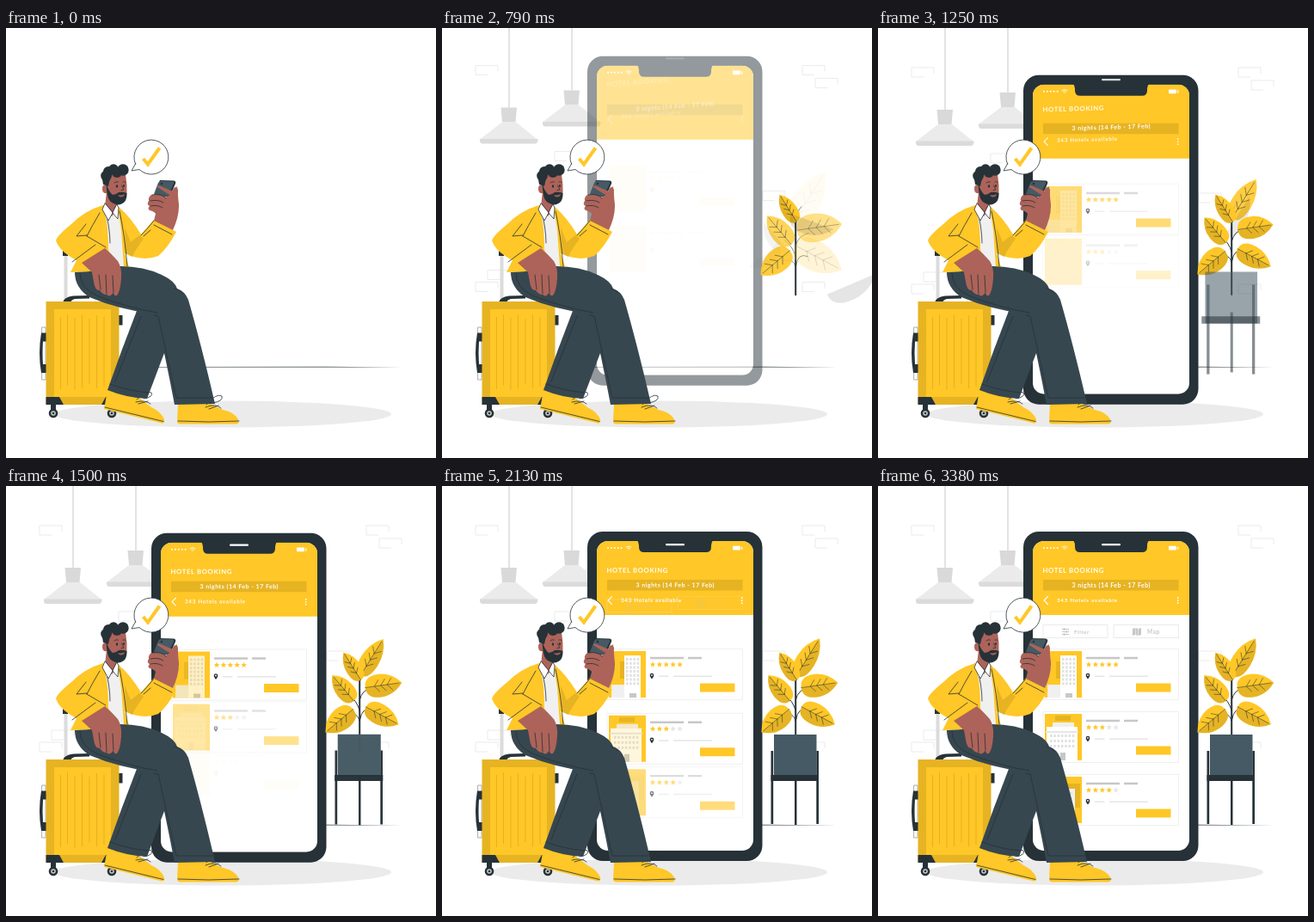
Recreate the animation shown at these times as an HTML page. Size 500x500 px, loop 3.46 s.

```html
<!DOCTYPE html>
<html lang="en">
<head>
<meta charset="utf-8">
<title>Hotel booking</title>
<style>
html, body { margin: 0; width: 100%; height: 100%; overflow: hidden; background: #fff; }
svg { display: block; width: 100vw; height: 100vh; }
text { font-family: Lato, sans-serif; font-weight: 700; }
.y { fill: #ffc727; } .d { fill: #263238; } .p { fill: #37474f; } .skin { fill: #ad6359; }
.w { fill: #fff; } .g { fill: #c7c7c7; } .l { fill: #e6e6e6; } .f { fill: #f0f0f0; } .dy { fill: #e6b323; }
.s { fill: none; stroke: #263238; stroke-width: .8; stroke-linecap: round; stroke-linejoin: round; }
.ws { fill: none; stroke: #fff; stroke-width: 1.2; stroke-linecap: round; stroke-linejoin: round; }
.b { fill: none; stroke: #ebebeb; stroke-width: 1; }
</style>
</head>
<body>
<svg viewBox="0 0 500 500">
<defs>
  <clipPath id="screen"><rect x="180" y="64" width="182" height="360" rx="13"/></clipPath>
  <g id="lamp">
    <path d="M78 0V95" stroke="#c7c7c7"/>
    <path fill="#d9d9d9" d="M68.500 95H87L85.500 112H70Z"/>
    <path fill="#ebebeb" d="M70 112H86L111 132H44Z"/>
    <path fill="#dbdbdb" d="M44 131.500H111.500V133Q111 137 108 137H47Q44 137 44 133Z"/>
  </g>
  <path id="star" d="M0-3.300 1-1.100 3.300-.9 1.500.7 2.100 3 0 1.700-2.100 3-1.500.7-3.300-.9-1-1.100Z"/>
  <path id="brick" class="b" d="M14 11H0V0H26V7"/>
  <g id="wheel"><circle r="5.300" class="d"/><circle r="2.800" fill="#c7c7c7"/><circle r="1.300" class="d"/></g>
</defs>

<ellipse cx="252" cy="449" rx="196" ry="15.500" fill="#ebebeb"/>
<path class="d" d="M176 393.900 372 393.800 460 394.400 372 394.600 176 394.600Z"/>

<g id="backdrop">
  <use href="#lamp"/><use href="#lamp" x="73" y="-20"/>
</g>

<g id="phone">
  <rect class="d" x="169" y="53" width="203.500" height="383" rx="18"/>
  <g clip-path="url(#screen)">
    <path class="w" d="M180 64H362V424H180Z"/>
    <path class="y" d="M180 64H362V150H180Z"/>
  </g>
  <path class="d" d="M226 62Q229 65 229 69V71Q229 77 235 77H307Q313 77 313 71V69Q313 65 316 62Z"/>
  <path class="ws" style="stroke-width:2" stroke-dasharray="0 3.900" d="M193 72H209"/>
  <path class="ws" style="stroke-width:.9" d="M214 71Q217 68.500 220 71M215.500 72.500Q217 71.200 218.500 72.500M217 74V74"/>
  <rect class="w" x="338" y="69.800" width="9" height="4.800" rx="1"/><path class="ws" d="M348.800 71V73.500"/>
  <path class="dy" d="M192 109H349.500V121.500H192Z"/>
  <g id="nav">
    <path class="ws" d="M197.500 128.500 193 133 197.500 137.500"/>
    <path class="ws" style="stroke-width:1.800" d="M348.700 130V130M348.700 133V133M348.700 136V136"/>
  </g>
  <g class="w">
    <text id="title" x="191.500" y="100.500" font-size="7.700" letter-spacing=".65">HOTEL BOOKING</text>
    <text id="nights" x="225.500" y="117.500" font-size="7" letter-spacing=".5">3 nights (14 Feb - 17 Feb)</text>
    <text id="count" x="208" y="134.800" font-size="6.300" letter-spacing=".7">343 Hotels available</text>
  </g>
</g>
<rect id="speaker" class="w" x="260" y="67" width="22" height="2.200" rx="1"/>

<g id="filter">
  <rect class="b" x="192" y="161.500" width="75" height="15"/>
  <path stroke="#c7c7c7" d="M214 166.500H222M214 169.500H222M214 172.500H222M216.500 165V168M219.500 168V171M216.500 171V174"/>
  <text class="g" x="228" y="171.700" font-size="6.300" letter-spacing=".5">Filter</text>
</g>
<g id="map">
  <rect class="b" x="274" y="161.500" width="75.500" height="15"/>
  <path class="g" d="M296 166 299 165V173L296 174ZM299.500 165 302.500 166V174L299.500 173ZM303 166 306 165V173L303 174Z"/>
  <text class="g" x="313" y="171.700" font-size="6.500" letter-spacing=".6">Map</text>
</g>
<g id="cards"></g>

<g id="plant">
  <path id="stem" class="s" style="stroke-width:2" d="M411.200 310V217"/>
  <path id="twigs" class="s" style="stroke-width:1" d="M411.500 222Q412 209 418 203M411.500 228Q411 222 407 217M411.500 248Q414 237 426 234M411.500 262Q408 249 398 242M411.500 272Q414 256 425 261M411.500 274Q409 262 397 266"/>
  <g id="leaves"></g>
  <g id="stand">
    <path class="d" d="M382.500 308H385.200V393H382.500Z"/>
    <path class="d" d="M410 337H412.500V394H410Z"/>
    <path class="d" d="M435.300 308H438V393H435.300Z"/>
    <path fill="#455a64" d="M386 289H435.500V338H386Z"/>
    <path class="d" d="M382.500 336H438V343H382.500Z"/>
  </g>
</g>

<g id="suitcase">
  <path fill="#dbdbdb" d="M67.500 264H71.500V319H67.500Z"/>
  <path class="d" d="M66 259H72V265H66ZM66 319Q67 313 78 311.500L97 311V314.500L80 315Q76 316 75 319ZM131 334H135.500V345.500H131Z"/>
  <path class="w s" d="M42 348H46V409H42Z" style="stroke:#999"/>
  <path class="d" d="M41 354.500H47V364.500H43Q42 378 43 391H47V401H41Q37 378 41 354.500Z"/>
  <path class="dy" d="M46.500 318H131.500V438H46.500Z"/>
  <path class="y" d="M56 327H122V429H56Z"/>
  <path d="M63.500 336V420M71.500 333V416M80 337V421M88.500 334V419M97 338V414M105.500 334V419M114 336V417" stroke="#dba91c" stroke-width=".7"/>
  <path class="d" d="M46.500 429H62L67 438H46.500ZM131.500 429H116L111 438H131.500ZM52 438H58V444H52ZM120 438H126V444H120Z"/>
  <use href="#wheel" x="55" y="448"/><use href="#wheel" x="123" y="448"/>
</g>

<g id="man">
  <path class="y" d="M118 421 114 443 181 459.500Q185 460 184 455 180 446 169 441L155 430Z"/>
  <path class="s" d="M115 441 183 457.500M152 432Q164 420 169 424 172 429 160 431M151 435Q162 432 168 437M154 437 165 434"/>
  <path class="p" d="M152 329Q134 375 118 421 140 430 164 431L187 370 195 320Z"/>
  <path class="s" d="M121 414Q142 422 166 424M157 335 127 411"/>
  <path class="y" d="M200 437 199 457Q199 460.500 203 460.500H268Q272 460 270 455 266 447 252 444L236 436Z"/>
  <path class="s" d="M200 457Q236 459 271 457M233 438Q245 424 251 428 253 434 240 436M232 441Q244 436 250 442M236 443 247 439"/>
  <path class="y" d="M113 206Q92 212 76 228 60 241 58 247 62 260 82 270L75 284 101 283 143 278 138 262Q160 272 177 265 188 256 198 237L172 223 157 240Q145 220 131 208Z"/>
  <path class="f" d="M114 208 130 209 134 235 137 277 128 278 119 258Q119 235 116 220Z"/>
  <path class="dy" d="M138 232 145 249 155 241 160 245Q150 258 147 266L139 262Z"/>
  <path class="s" d="M132 213Q138 240 141 277M172 229 193 240M157 241Q163 235 172 224M160 242 168 235M109 215Q100 230 94 242M94 242 116 255M93 228 82 242 94 241M77 272 104 252M115 210Q121 232 121 250"/>
  <path class="p" d="M80 284Q110 283 133 277 160 277 181 287 196 294 199 303 208 306 212 316 227 368 243 437L196 438Q185 380 174 333 130 327 97 313 80 302 80 284Z"/>
  <path class="s" d="M86 285Q86 302 105 311 140 325 176 331M196 303Q201 304 205 308M172 334 177 335 198 430 240 430"/>
  <path class="skin" d="M117 190 115 208 123 219 130 210 130 200Z"/>
  <path class="s" style="fill:#fff" d="M115 204 112 211 119 224 124 215ZM124 215 130 222 131 209 129 205Z"/>
  <path class="skin" d="M115 170H139Q141 182 140.500 192 139 200 130 202 119 200 117 192 112 193 112 187 112 182 116 183Z"/>
  <path class="d" d="M116.500 180Q119 190 124 194 128 194 131 191 136 190 140.500 192 141 204 131 205.500 122 205 119 198 117 192 116.500 180Z"/>
  <path class="skin" d="M130 194Q134 195.500 138 193 137 196.500 134 196.500 131 196.500 130 194Z"/>
  <g class="d">
    <path d="M111 170H122L119 184 113 182Z"/>
    <circle cx="116.500" cy="172" r="6.300"/><circle cx="119" cy="167" r="6"/><circle cx="125" cy="164" r="5.800"/>
    <circle cx="129" cy="168" r="6"/><circle cx="136" cy="165" r="6.700"/>
    <ellipse cx="129" cy="184" rx="1.200" ry="1.700"/><ellipse cx="137" cy="183.500" rx="1" ry="1.600"/>
  </g>
  <path class="s" d="M134.500 183 137 188 134 188.500M126 180Q128 178 130.500 179M136 179Q138 178 139 179.500"/>
  <path class="skin" d="M88 273 115 256Q122 262 130 271 135 279 134 291 133 306 129 311 125 312 125 307 121 314 117 310 112 310 109 305 103 305 102 295L100 284Z"/>
  <path class="s" d="M108 287 110 304M116 287 117 309M124 288 125 307"/>
  <path class="skin" d="M172 224 194 235Q201 220 201 207 199 196 200 188 197 182 194 188L190 205 176 208Z"/>
  <path class="d" d="M179 177 195 177.500Q198 178 197 181L190 197 173 194Z"/>
  <path fill="#455a64" d="M180 178 194 178.500Q196 179 195 181L188 196 172 193 177 180Q178 178 180 178Z"/>
  <circle class="d" cx="181" cy="181" r="1.300"/>
  <path class="skin" d="M176 185Q175 182 180 184L194 190 199 184 201 207 194 224 176 220Q174 213 167 212 164 210 167 207 163 205 166 201 165 197 169 194 178 192 186 197L190 194Z"/>
  <path class="s" d="M168 201Q177 199 183 203M168 207Q176 205 182 209M170 194Q181 192 186 198"/>
</g>

<path class="s" style="fill:#fff" d="M150.500 158 146 166 155 164.500A20 20 0 1 0 150.500 158Z"/>
<path d="M159.500 152 165 158.500 178.500 139.500" fill="none" stroke="#ffc727" stroke-width="4"/>
</svg>
<script>
const LOOP = 3460;
const $ = id => document.getElementById(id);

// Cubic Bezier (.36, -.01, .5, 1.38): slow start, slight overshoot
function ease(x) {
  if (x <= 0) return 0;
  if (x >= 1) return 1;
  let lo = 0, hi = 1, s;
  const at = (a, b) => 3 * a * s * (1 - s) ** 2 + 3 * b * s * s * (1 - s) + s ** 3;
  for (let i = 0; i < 24; i++) {
    s = (lo + hi) / 2;
    if (at(.36, .5) < x) lo = s; else hi = s;
  }
  return at(-.01, 1.38);
}

// Piecewise linear track of [time, ...values]
function track(t, keys) {
  const i = keys.findIndex(k => k[0] > t);
  if (i === 0) return keys[0].slice(1);
  if (i < 0) return keys.at(-1).slice(1);
  const [a, b] = [keys[i - 1], keys[i]], u = (t - a[0]) / (b[0] - a[0]);
  return a.slice(1).map((v, j) => v + (b[j + 1] - v) * u);
}

function place(el, transform, opacity) {
  el.setAttribute('transform', transform);
  el.setAttribute('opacity', Math.max(0, Math.min(1, opacity)));
}

const bricks = [[39, 46], [419, 46], [434, 61], [39, 298], [53, 284], [373, 192], [419, 298], [131, 146]];
$('backdrop').insertAdjacentHTML('afterbegin',
  bricks.map(([x, y]) => `<use href="#brick" x="${x}" y="${y}"/>`).join(''));

const grid = (x, y, cols, rows, dx, dy) => {
  let d = '';
  for (let r = 0; r < rows; r++) for (let c = 0; c < cols; c++) d += `M${x + c * dx} ${y + r * dy}h2.500v3h-2.500z`;
  return `<path d="${d}" fill="#e0e0e0"/>`;
};
const buildings = [
  `<path class="dy" d="M207 12H213V32H207Z"/><path class="f" d="M197 39H212V54H197Z"/>
   <path class="w" d="M212 5H231V54H212Z"/>${grid(214, 8, 4, 7, 4.200, 4.700)}<path class="g" d="M218 49H226V54H218Z"/>`,
  `<path class="dy" d="M206 2H224V8H206Z"/><path class="f" d="M203 10H228V15H203Z"/><path class="w" d="M196 15H232V54H196Z"/>
   <path class="l" d="M195 20H233V22H195Z"/>${grid(200, 24, 7, 3, 4.300, 6)}<path class="g" d="M212 45H218V54H212Z"/>`,
  `<path class="dy" d="M215 8H235V36H215Z"/><path class="f" d="M200 14H229V54H200Z"/>${grid(218, 18, 2, 5, 5, 6)}`
];
const cards = [
  { start: 457, dur: 1500, stars: 5 },
  { start: 340, dur: 2400, stars: 3 },
  { start: 1026, dur: 2130, stars: 4 }
];
$('cards').innerHTML = cards.map(({ stars }, i) => `<g><g transform="translate(0 ${192 + 73 * i})">
  <rect class="b" x="192" y="-2.500" width="157.500" height="59" style="stroke:#f0f0f0"/>
  <path class="y" d="M194 0H237V54H194Z"/><g class="building">${buildings[i]}</g>
  <path class="g" d="M242 6.800H281V9.200H242ZM286 6.800H302V9.200H286Z"/>
  ${[0, 1, 2, 3, 4].map(n => `<use href="#star" x="${245 + 7.900 * n}" y="15.500" class="${n < stars ? 'y' : 'l'}"/>`).join('')}
  <path class="d" d="M244 32.500Q241.500 29 241.700 28A2.300 2.300 0 0 1 246.300 28Q246.500 29 244 32.500Z"/><circle class="w" cx="244" cy="28" r=".9"/>
  <path class="l" d="M252 28.500H263.500V30H252ZM269 28.500H314V30H269Z"/>
  <path class="y" d="M300 37.500H340.500V47.500H300Z"/></g></g>`).join('');

// Centre, angle, length, width, start time and the route of the shaded half: time, dx, dy, turn
const leaves = [
  { x: 425.5, y: 199, a: -58, l: 51, w: 21, start: 670, route: [[900, -8, 36, 0], [1250, -8, 20, 0], [1400, 0, 0, 0]] },
  { x: 402.5, y: 209.5, a: -122, l: 38, w: 17, start: 70, route: [[250, 8, 5, 0], [600, 0, 0, 0]] },
  { x: 439, y: 231.5, a: -8, l: 43, w: 25, start: 390, route: [[300, -26, 10, 90], [630, -18, -14, 60], [930, 0, 0, 0]] },
  { x: 392, y: 235, a: -130, l: 39, w: 20, start: 285, route: [[600, -10, 20, 0], [900, 0, 0, 0]] },
  { x: 437.5, y: 267, a: 28, l: 44, w: 23, start: 560, route: [[250, 10, 150, -90], [630, 23, 59, -73], [960, 55, 1, -28], [1170, 30, -4, -10], [1250, 0, 0, 0]] },
  { x: 387.5, y: 273, a: 140, l: 42, w: 24, start: 200, route: [[700, -16, -12, 0], [960, -9, -4, 0], [1200, 0, 0, 0]] }
];
$('leaves').innerHTML = leaves.map(({ l, w, a }) => {
  const h = l / 2, side = Math.abs(a) > 90 ? -1 : 1, k = w * .54;
  const half = v => `Q${-h} ${v} ${-h * .2} ${v}Q${h * .5} ${v} ${h} 0`;
  let veins = `M${-h} 0H${h * .85}`;
  for (const u of [-.5, -.15, .2]) veins += `M${u * h} 0l${h * .25} ${-k * .5}M${u * h} 0l${h * .25} ${k * .5}`;
  return `<path class="y" d="M${-h} 0${half(-k)}M${-h} 0${half(k)}"/>
    <path d="M${-h} 0${half(k * side)}Z"/>
    <path class="s" style="stroke-width:.5" d="${veins}"/>`;
}).join('');
const leafParts = [...$('leaves').children];

const slide = (el, p, dy, opacity = p) => place(el, `translate(0 ${dy * (1 - p)})`, opacity);

// Shrinks from 1.5 times the size about the element's own centre
function zoom(el, p) {
  const box = el.getBBox(), x = box.x + box.width / 2, y = box.y + box.height / 2, s = 1.5 - .5 * p;
  place(el, `translate(${x} ${y}) scale(${s}) translate(${-x} ${-y})`, p);
}

// Text swings about a vertical axis at pivot
function swing(id, slope, pivot, opacity) {
  place($(id), `matrix(1 ${slope} 0 1 0 ${-slope * pivot})`, opacity);
}

function draw(t) {
  if (t < 80) t = 0;
  const p = (start, dur = 1000) => ease((t - start) / dur);

  slide($('backdrop'), p(0), 40);
  slide($('phone'), p(305, 1280), -40);
  slide($('speaker'), p(457, 1500), -40);
  const [slope] = track(t, [[400, -.1], [960, -.062], [1250, -.028], [1600, .012], [1750, .011], [2200, 0]]);
  const [fade] = track(t, [[600, 0], [960, .6], [1250, .9], [1600, 1]]);
  swing('title', slope, 28, fade);
  swing('nights', slope, 220, fade * 1.6);
  swing('count', slope, 80, fade);
  place($('nav'), `translate(0 ${slope * 90})`, fade);

  cards.forEach(({ start, dur }, i) => {
    const card = $('cards').children[i], q = p(start, dur);
    slide(card, q, -40, q * q);
    card.querySelector('.building').setAttribute('opacity', Math.max(0, p(start + .3 * dur, .8 * dur)));
  });
  slide($('filter'), p(1790, 1280), -40);
  slide($('map'), p(1850, 1280), -40);

  slide($('stem'), p(115), 40);
  slide($('twigs'), p(390), 10);
  leaves.forEach(({ x, y, a, start, route }, i) => {
    const q = p(start), scale = `scale(${1.5 - .5 * q})`, [dx, dy, turn] = track(t, route);
    const [body, shade, veins] = leafParts.slice(i * 3, i * 3 + 3);
    const pose = `translate(${x} ${y}) rotate(${a}) ${scale}`;
    place(body, pose, q);
    place(veins, pose, q);
    place(shade, `translate(${x + dx} ${y + dy}) rotate(${a + turn}) ${scale}`,
      .1 * Math.min(1, Math.max(0, (t - route[0][0]) / 400)));
  });
  for (const part of $('stand').children) zoom(part, p(845));
}

function frame() {
  draw(performance.now() % LOOP);
  requestAnimationFrame(frame);
}
frame();
</script>
</body>
</html>
```
